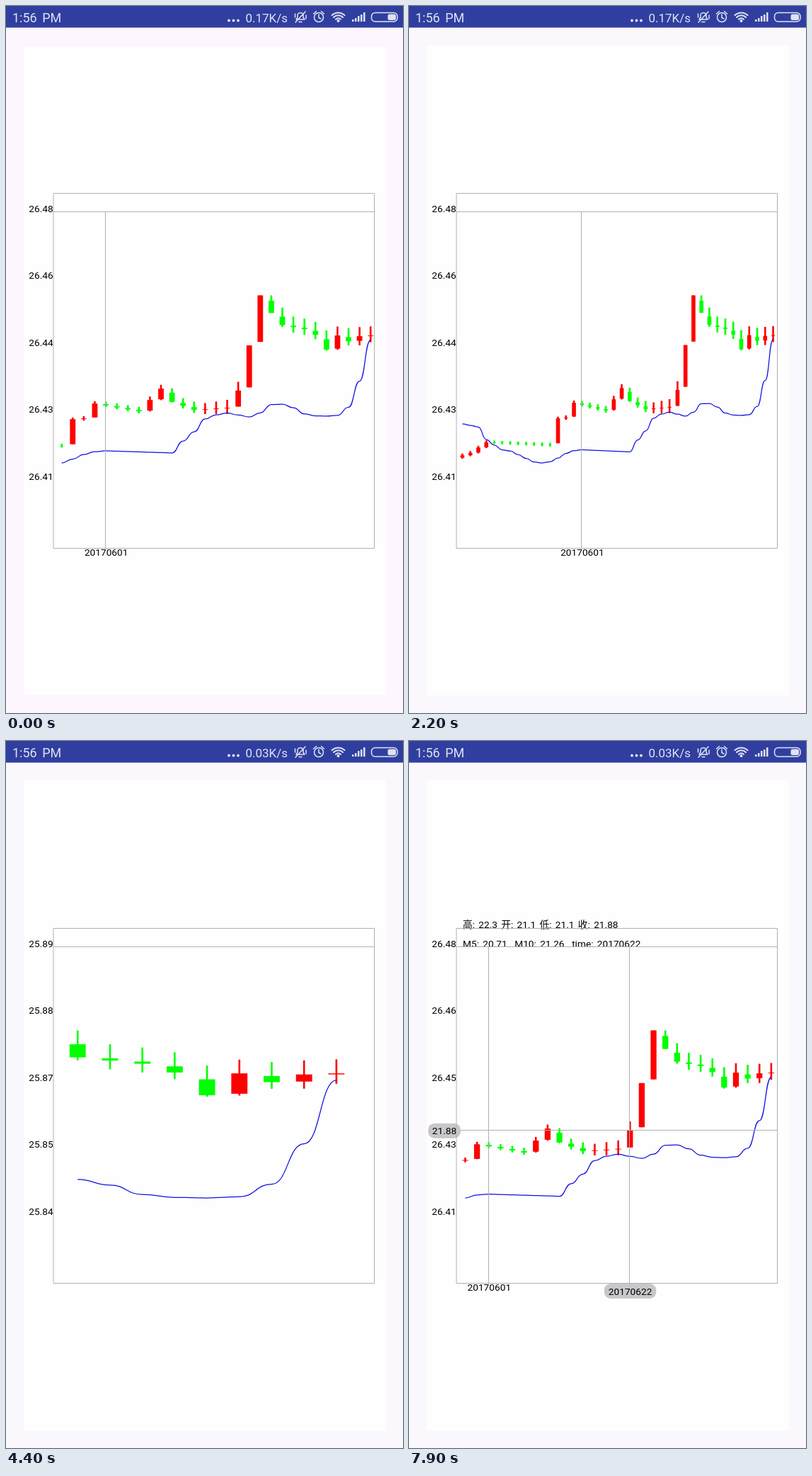
Animation, 561 px wide and 998 px high, one loop 8 s. Source, as an HTML page:

```html
<!DOCTYPE html>
<html lang="en">
<head>
<meta charset="utf-8">
<title>Candlestick chart</title>
<style>
  html, body { margin: 0; width: 100%; height: 100%; overflow: hidden; background: #faf8fc; }
  svg { display: block; width: 100%; height: 100%; }
  text { font: 13.7px Roboto, "Noto Sans CJK SC", "Noto Sans CJK", sans-serif; word-spacing: 1.9px; fill: #000; white-space: pre; }
  .status text { font-size: 17px; fill: #dfe2f2; }
  .status .clock { font-size: 18px; word-spacing: 3px; }
  .icon { fill: none; stroke: #dfe2f2; stroke-width: 1.5; stroke-linecap: round; stroke-linejoin: round; }
  .solid { fill: #dfe2f2; }
  .grid { fill: none; stroke: #b0b0b0; }
  .average { fill: none; stroke: #1010e0; stroke-width: 1.25; }
</style>
</head>
<body>
<svg viewBox="0 0 561 998">
  <rect id="page" width="561" height="998"/>
  <rect id="card" x="25" width="511.5" fill="#fefefe"/>
  <g class="status">
    <rect width="561" height="30.5" fill="#303f9f"/>
    <text class="clock" x="9" y="22.5">1:56 PM</text>
    <text id="speed" x="398" y="22.5" text-anchor="end"></text>
    <g class="solid">
      <circle cx="315" cy="20.5" r="1.9"/><circle cx="321.5" cy="20.5" r="1.9"/><circle cx="328" cy="20.5" r="1.9"/>
      <circle cx="469.5" cy="21" r="2"/>
      <path d="M489 22v-3h2.5v3zM493 22v-5h2.5v5zM497 22v-8h2.5v8zM501 22v-10h2.5v10zM505 22v-13h2.5v13z"/>
      <rect x="539.5" y="11.5" width="11.5" height="8.5" rx="2.5"/>
    </g>
    <g class="icon">
      <path d="M410 19h12l-2-3v-4a4.5 4.5 0 0 0-8 0v4zM414 22.5h4M409 23l14-15M408.5 11v5M424 13v5"/>
      <circle cx="442" cy="16" r="6.5"/>
      <path d="M442 12v4.500l3 1.500M434.500 11l4-3.500M449.500 11l-4-3.500"/>
      <path d="M460.500 13a13 13 0 0 1 18 0M463 16a9 9 0 0 1 13 0M466 18.800a5 5 0 0 1 7 0" stroke-width="2"/>
      <rect x="516.5" y="9.5" width="36.5" height="12.5" rx="5"/>
    </g>
  </g>
  <g id="chart"></g>
</svg>
<script>
const LOOP = 8000, STEP = 100;
const LEFT = 67, RIGHT = 521, TOP = 290.5, BOTTOM = 765.5;
const HIGH_Y = 408.5, SPAN = 236.5;
const MAX_PRICE = 26.48, PRICE_PER_UNIT = 0.0343;
const CANDLES = 62, MONTH_START = 36;

// Turning points of the closing level: [day, level], levels grow downwards.
const turns = [
  [-12, 564], [-8, 556], [-3, 578], [3, 571], [6, 584], [9, 578], [13, 587], [14, 624], [15, 613],
  [20, 639], [22, 632], [24, 617], [32, 621], [33, 583], [34, 582], [35, 561], [39, 572], [41, 540],
  [42, 558.5], [44, 570], [47, 567], [48, 542.6], [49, 479], [50, 408.5], [51, 433.3], [52, 450.4],
  [54, 456.2], [55, 464.2], [56, 485], [57, 465], [58, 473], [59, 466], [60, 465], [61, 456]
];
// [time, distance between candles]
const zooms = [
  [0, 15.59], [700, 15.59], [1400, 7.27], [2000, 7.27], [2600, 27], [2900, 46.1], [3100, 51.5],
  [3800, 51.5], [4100, 46.9], [4300, 46.9], [4400, 45.7], [5100, 16.63], [LOOP, 16.63]
];

const linear = (a, b, p) => a + (b - a) * p;
const geometric = (a, b, p) => a * (b / a) ** p;
function along(keys, at, mix) {
  const next = Math.max(1, keys.findIndex(([key]) => key >= at));
  const [k0, a] = keys[next - 1], [k1, b] = keys[next];
  return mix(a, b, (at - k0) / (k1 - k0));
}

const closeAt = i => along(turns, i, linear);
const averageAt = i => 10 + 0.45 * closeAt(i - 10) + 0.33 * closeAt(i - 11) + 0.22 * closeAt(i - 12);

// Body and wicks follow from the day's move; wicks lengthen towards the latest days.
function makeCandle(i, previousHigh) {
  const close = closeAt(i), move = close - closeAt(i - 1), rising = move < 0;
  const open = close - move * (rising ? 0.93 : 0.7);
  const top = Math.min(open, close), bottom = Math.max(open, close);
  const wick = Math.min(1, 0.2 + 0.8 * (i / 48) ** 8);
  const reach = top - wick * Math.max(0, 12.82 - (move / 28.6) ** 4);
  const high = rising ? reach : Math.min(top, Math.max(reach, previousHigh));
  const low = bottom + wick * Math.max(0, 9.08 - 0.372 * Math.abs(move));
  return { open, close, top, bottom, high, low, rising, average: averageAt(i) };
}

const candles = [];
for (let i = 0; i < CANDLES; i++) candles.push(makeCandle(i, i ? candles[i - 1].high : 0));

const byId = id => document.getElementById(id);
const crisp = v => Math.round(v) - 0.5;
const price = level => MAX_PRICE - (level - HIGH_Y) * PRICE_PER_UNIT;
const short = value => String(Math.round(value * 100) / 100);
const path = (d, cls) => `<path class="${cls}" d="${d}"/>`;
const text = (x, y, s, anchor = "start") => `<text x="${x}" y="${y}" text-anchor="${anchor}">${s}</text>`;
const box = (x, y, w, h, fill, rx = 0) =>
  `<rect x="${x}" y="${y}" width="${w}" height="${h}" rx="${rx}" fill="${fill}"/>`;
const pill = (cx, cy, w, s) =>
  box(cx - w / 2, cy - 10.5, w, 21, "#c9c7ca", 9) + text(cx, cy + 5, s, "middle");

function viewAt(t) {
  const gap = along(zooms, t, geometric);
  const count = Math.min(CANDLES, Math.floor((RIGHT - LEFT) / gap));
  const first = Math.max(0, CANDLES - 1 - count);
  const shown = candles.slice(first, first + count);
  const top = Math.min(...shown.map(c => Math.min(c.high, c.average)));
  const range = Math.max(...shown.map(c => Math.max(c.low, c.average))) - top;
  return {
    gap, first, shown, top, range,
    x: i => LEFT + gap * (i - first + 0.75),
    y: level => HIGH_Y + (level - top) / range * SPAN
  };
}

function drawCandle(view, c, k) {
  const x = view.x(view.first + k), fill = c.rising ? "#f00" : "#0f0";
  const bar = (from, to, w) => box(x - w / 2, view.y(from), w, view.y(to) - view.y(from), fill);
  return bar(c.high, c.low, 2.6) + bar(c.top, c.bottom, view.gap / 2);
}

function drawAverage(view) {
  const d = view.shown.map((c, k) => {
    const x = view.x(view.first + k), y = view.y(c.average);
    if (!k) return `M${x} ${y}`;
    const mid = x - view.gap / 2;
    return `C${mid} ${view.y(view.shown[k - 1].average)} ${mid} ${y} ${x} ${y}`;
  });
  return path(d.join(""), "average");
}

function drawAxes(view) {
  let out = path(`M${LEFT} 264.5H520.5V${BOTTOM}H${LEFT}ZM${LEFT} ${TOP}H520.5`, "grid");
  const step = view.range * PRICE_PER_UNIT / 460;
  for (let k = 0; k < 5; k++) {
    out += text(66.7, 290.5 + k * 94.6, (price(view.top) - k * step).toFixed(2), "end");
  }
  if (view.first <= MONTH_START) {
    const x = view.x(MONTH_START);
    out += path(`M${crisp(x)} ${TOP}V${BOTTOM}`, "grid") + text(x + 0.6, 776, "20170601", "middle");
  }
  return out;
}

// Counts weekdays from 22 June, a Thursday.
function dateOf(i) {
  const days = i - 48;
  const d = new Date(Date.UTC(2017, 5, 22 + days + 2 * Math.floor((days + 3) / 5)));
  return d.toISOString().slice(0, 10).replaceAll("-", "");
}

function drawCrosshair(view, i) {
  const c = candles[i], x = view.x(i), y = view.y(c.close);
  const upper = price(c.top), lower = price(c.bottom);
  const [high, open, low, close] = [c.high, c.open, c.low, c.close].map(level => short(price(level)));
  return path(`M${LEFT} ${crisp(y)}H${RIGHT}M${crisp(x)} ${TOP}V${BOTTOM}`, "grid") +
    pill(50, y + 0.3, 46, short(upper)) +
    pill(x + 0.3, 776.5, 73.5, dateOf(i)) +
    text(76, 264, `高: ${high} 开: ${open} 低: ${low} 收: ${close}`) +
    text(76, 290.5, `M5: 20.71  M10: ${short(linear(lower, upper, 0.2))}  time: ${dateOf(i)}`);
}

function draw(t) {
  const view = viewAt(t), settled = t >= 800;
  const cardTop = settled ? 56 : 58;
  byId("page").setAttribute("fill", settled ? "#faf8fc" : "#fdf6fe");
  byId("card").setAttribute("y", cardTop);
  byId("card").setAttribute("height", 973 - cardTop);
  byId("speed").textContent = t < 3300 ? "0.17K/s" : "0.03K/s";
  let out = view.shown.map((c, k) => drawCandle(view, c, k)).join("") + drawAverage(view);
  if (t >= 6800) {
    const progress = Math.max(0, t - 6900) / 1000;
    out += drawCrosshair(view, Math.round(linear(55, 48, progress)));
  }
  byId("chart").innerHTML = out + drawAxes(view);
}

const begin = performance.now();
let last = -1;
function tick() {
  const elapsed = (performance.now() - begin) % LOOP;
  const t = Math.floor(elapsed / STEP) * STEP;
  if (t !== last) draw(last = t);
  requestAnimationFrame(tick);
}
tick();
</script>
</body>
</html>
```
